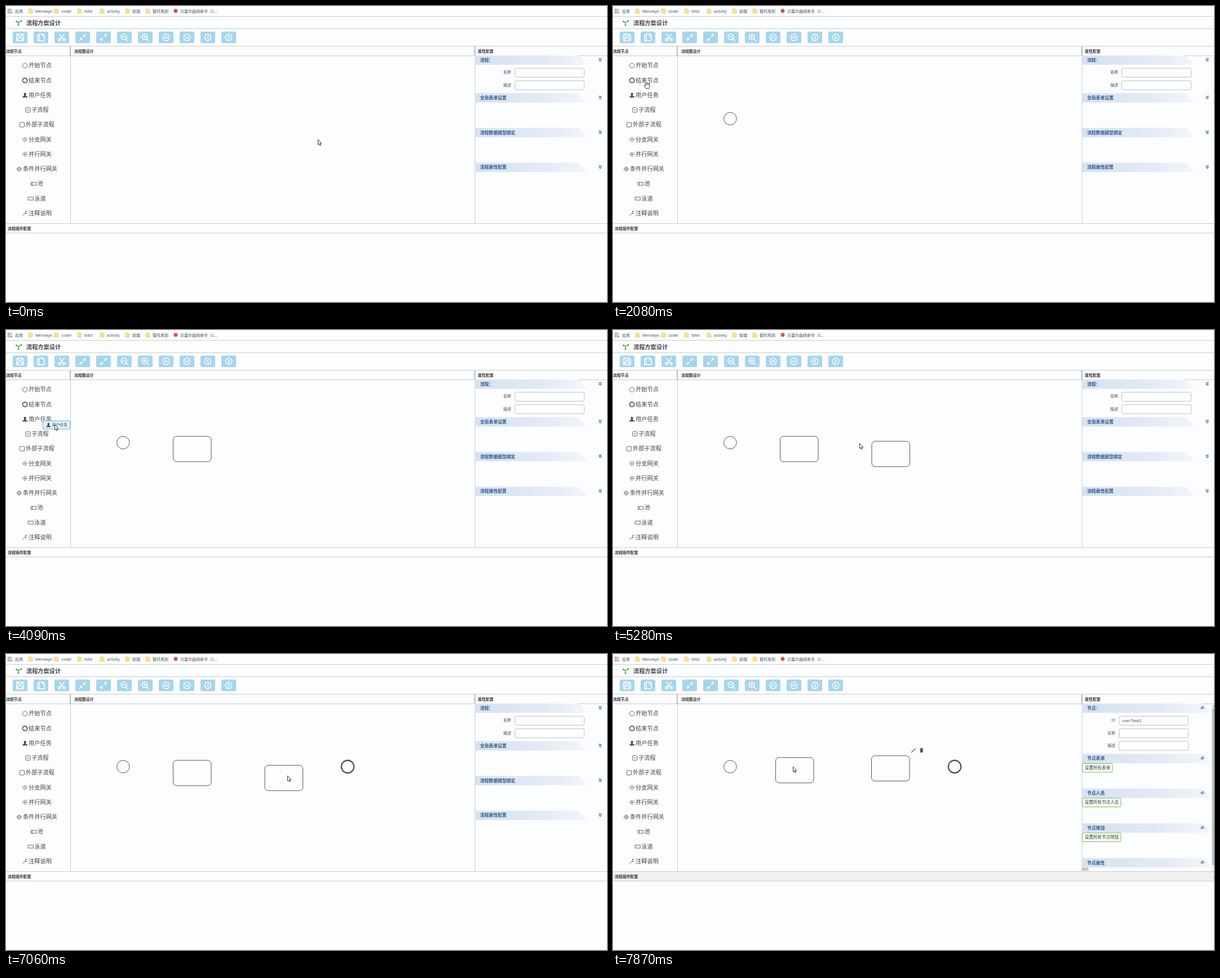
Recreate the animation shown at these times as an HTML page. Size 1066 by 526 pixels, loop 7.99 s.

```html
<!DOCTYPE html>
<html lang="zh-CN">
<head>
<meta charset="utf-8">
<title>流程方案设计</title>
<style>
html, body { margin: 0; width: 100%; height: 100%; overflow: hidden; background: #fcfdff; }
svg { display: block; width: 1066px; height: 526px; }
text { font-family: "Open Sans", "Noto Sans CJK SC", "Noto Sans CJK JP", sans-serif; white-space: pre; }
.line { fill: none; stroke: #555; stroke-width: 1; }
.white { fill: none; stroke: #fff; stroke-width: 1.5; stroke-linecap: round; stroke-linejoin: round; }
</style>
</head>
<body>
<svg id="stage" viewBox="0 0 1066 526">
  <defs>
    <linearGradient id="bar">
      <stop offset="0" stop-color="#d6e2f1"/>
      <stop offset=".6" stop-color="#e2eaf5"/>
      <stop offset="1" stop-color="#f3f6fb"/>
    </linearGradient>
  </defs>
</svg>
<script>
const NS = 'http://www.w3.org/2000/svg';
const stage = document.getElementById('stage');

function el(tag, attrs, parent = stage) {
  const e = document.createElementNS(NS, tag);
  for (const k in attrs) e.setAttribute(k, attrs[k]);
  return parent.appendChild(e);
}
const group = (parent, x = 0, y = 0) => el('g', { transform: `translate(${x} ${y})` }, parent);
const path = (d, attrs, parent) => el('path', { d, ...attrs }, parent);
const rect = (x, y, width, height, attrs, parent) => el('rect', { x, y, width, height, ...attrs }, parent);
const circle = (cx, cy, r, attrs, parent) => el('circle', { cx, cy, r, ...attrs }, parent);

// y is the middle of the line of text
function text(s, x, y, size, attrs, parent) {
  const e = el('text', { x, y: y + size * 0.37, 'font-size': size, fill: '#444', ...attrs }, parent);
  e.textContent = s;
  return e;
}
const show = (e, on) => { e.style.display = on ? '' : 'none'; };
const place = (e, x, y) => e.setAttribute('transform', `translate(${x} ${y})`);

// Bookmark bar
const dots = ['#e0483e', '#e0483e', '#f2b632', '#45a45c', '#4a86e8', '#f2b632', '#45a45c', '#4a86e8', '#e0483e'];
dots.forEach((fill, i) => rect(3 + i % 3 * 3, 5 + Math.floor(i / 3) * 3, 2, 2, { fill }));
text('应用', 16, 9, 7);
const marks = [['Merowyn', 40], ['coder', 86], ['tkfol', 127], ['activity', 167], ['前端', 212], ['暂时用到', 248]];
for (const [name, x] of marks) {
  path(`M${x} 5h5v1.5h2v6.5h-7z`, { fill: '#fbe08a', stroke: '#e8c558', 'stroke-width': .6 });
  text(name, x + 12, 9, 7);
}
circle(301, 8.7, 3.4, { fill: '#e5483c' });
text('贝塞尔曲线命令（C...', 309, 9, 7);

// Title
path('M22.5 29.5L18.5 27.5M22.5 29.5L27 26.5M22.5 29.5L22 34', { stroke: '#4f9f55', 'stroke-width': 1.4 });
[[18.5, 27.5], [27, 26.5], [22, 34]].forEach(([x, y]) => circle(x, y, 1.4, { fill: '#4f9f55' }));
text('流程方案设计', 36, 30, 10.2, { 'font-weight': 700 });

// Toolbar
const ring = 'M-5.7 0a5.7 5.7 0 1 0 11.4 0a5.7 5.7 0 1 0 -11.4 0';
const lens = 'M-6 -1a5 5 0 1 0 10 0a5 5 0 1 0 -10 0M2.6 2.6L6 6M-3.3 -1h4.6';
const tools = [
  'M-6 -6H4L6 -4V6H-6ZM-3 -6V-2H3V-6M-4 6V1.5H4V6',
  'M-3 -6H3L6 -3V6H-3ZM-3 -4H-6V6H-3M3 -6V-3H6',
  'M-4.5 -6L3 3M4.5 -6L-3 3M-6 4a2 2 0 1 0 4 0a2 2 0 1 0 -4 0M2 4a2 2 0 1 0 4 0a2 2 0 1 0 -4 0',
  'M5.5 -5.5L1.5 -1.5M1.5 -4V-1.5H4M-5.5 5.5L-1.5 1.5M-4 1.5H-1.5V4',
  'M1.5 -1.5L5 -5M2.5 -5H5V-2.5M-1.5 1.5L-5 5M-5 2.5V5H-2.5',
  lens,
  lens + 'M-1 -3.3v4.6',
  ring + 'M-2.6 1.2L0 -1.4L2.6 1.2',
  ring + 'M-2.6 -1.2L0 1.4L2.6 -1.2',
  ring + 'M1.2 -2.6L-1.4 0L1.2 2.6',
  ring + 'M-1.2 -2.6L1.4 0L-1.2 2.6'
];
tools.forEach((d, i) => {
  rect(12 + i * 37, 45.5, 26, 20.5, { rx: 2, fill: '#a5d6ec' });
  path(d, { class: 'white' }, group(stage, 25 + i * 37, 55.8));
});

// Frame lines and headings
const gray = { fill: '#c9cbcd' };
const footer = rect(0, 387, 1066, 16, { fill: '#f0f0f0' });
[18, 40, 71, 88, 386, 403].forEach(y => rect(0, y, 1066, 1, gray));
[114, 831.5].forEach(x => {
  rect(x, 71, 1, 315, gray);
  rect(x - 1, 71, 2, 17, { fill: '#bbb' });
});
const bold = { 'font-weight': 600, fill: '#333' };
text('流程节点', 0, 80, 6.9, bold);
text('流程图设计', 121, 80, 6.9, bold);
text('属性配置', 837, 80, 6.9, bold);
text('流程插件配置', 3, 395, 6.9, bold);

// Node palette
const person = 'M-4.5 4V2.6L-1.2 1.2V.4Q-2.4 -1 -2 -2.8Q-1.5 -4.3 0 -4.3T2 -2.8Q2.4 -1 1.2 .4V1.2L4.5 2.6V4Z';
const diamond = 'M0 -4.3L4.3 0L0 4.3L-4.3 0Z';
const box = 'M-3 -4H3Q4 -4 4 -3V3Q4 4 3 4H-3Q-4 4 -4 3V-3Q-4 -4 -3 -4Z';
const disc = 'M-4.2 0a4.2 4.2 0 1 0 8.4 0a4.2 4.2 0 1 0 -8.4 0';
const nodes = [
  ['开始节点', disc],
  ['结束节点', disc, { 'stroke-width': 1.7 }],
  ['用户任务', person, { fill: '#444', stroke: 'none' }],
  ['子流程', box + 'M-2 0H2'],
  ['外部子流程', box],
  ['分支网关', diamond + 'M-1.5 -1.5L1.5 1.5M1.5 -1.5L-1.5 1.5'],
  ['并行网关', diamond + 'M-2 0H2M0 -2V2'],
  ['条件并行网关', diamond + 'M-2 0a2 2 0 1 0 4 0a2 2 0 1 0 -4 0'],
  ['池', 'M-4.5 -2.7H4.5V2.7H-4.5ZM-2.2 -2.7V2.7'],
  ['泳道', 'M-4.5 -2.7H4.5V2.7H-4.5Z'],
  ['注释说明', 'M-4.5 4L1 -1M4 -4H1V0H3.5']
];
const glyph = (i, parent) => {
  const { fill = 'none', stroke = '#555', ...rest } = nodes[i][2] || {};
  path(nodes[i][1], { fill, stroke, 'stroke-width': .9, ...rest }, parent);
};
nodes.forEach(([name], i) => {
  const y = 106 + i * 26.25;
  const x = 60.5 - name.length * 5.1;
  text(name, x, y - .3, 10.2);
  glyph(i, group(stage, x - 6.5, y));
});

// Property panels
const chevrons = [];
function section(parent, title, y, right) {
  path(`M832 ${y - 8}H${right - 17}Q${right - 10} ${y - 4} ${right} ${y + 8.5}H832Z`, { fill: 'url(#bar)' }, parent);
  text(title, 841, y, 7.8, { 'font-weight': 600, fill: '#2a5588' }, parent);
}
function chevron(parent, x, y) {
  return path('M-2.5 -2.8L0 -.5L2.5 -2.8M-2.5 .3L0 2.6L2.5 .3',
    { fill: 'none', stroke: '#2a5588', 'stroke-width': 1.1 }, group(parent, x, y - .5));
}
function field(parent, label, x, y) {
  text(label, x - 6, y - .7, 7, { 'text-anchor': 'end' }, parent);
  rect(x + .5, y - 8, 123, 16, { rx: 2, fill: '#fcfdff', stroke: '#bfc1c3' }, parent);
}

const flowPanel = group();
[['流程：', 96], ['全局表单设置', 163], ['流程数据模型绑定', 224.7], ['流程属性配置', 286.5]].forEach(([s, y]) => {
  section(flowPanel, s, y, 1031);
  chevron(flowPanel, 1054, y);
});
field(flowPanel, '名称', 902, 118.5);
field(flowPanel, '描述', 902, 140.8);

const nodePanel = group();
const forms = [['节点：', 96], ['节点表单', 185.5, '设置所有表单'], ['节点人员', 247.2, '设置所有节点人员'],
  ['节点按钮', 309, '设置所有节点按钮'], ['节点属性', 370.7]];
forms.forEach(([s, y, button]) => {
  section(nodePanel, s, y, 1061);
  chevrons.push(chevron(nodePanel, 1045.5, y));
  if (!button) return;
  rect(832.5, y + 9, button.length * 7.55 + 8, 15.5, { rx: 2, fill: '#fafff6', stroke: '#6cc24a' }, nodePanel);
  text(button, 836.7, y + 16.5, 7.55, { fill: '#333' }, nodePanel);
});
field(nodePanel, 'ID', 897, 118.5);
field(nodePanel, '名称', 897, 140.8);
field(nodePanel, '描述', 897, 163.1);
text('userTask2', 903, 118.5, 7.4, {}, nodePanel);
text('005', 832, 382.3, 6.7, {}, nodePanel);
rect(1062, 89, 4, 297, { fill: '#f1f1f1' }, nodePanel);
rect(1062.5, 97, 3.5, 278, { fill: '#bfbfbf' }, nodePanel);
path('M1063 94l2 -2l1 1v1zM1064 398l2 -2v2z', { fill: '#777' }, nodePanel);

// Diagram
const startEvent = circle(207.8, 200.2, 11.2, { class: 'line' });
const endEvent = circle(606, 200.2, 11.2, { class: 'line', style: 'stroke-width:2.3' });
const task = () => rect(.5, .5, 67.5, 45, { rx: 6, class: 'line' }, group());
const task1 = task().parentNode;
const task2 = task().parentNode;
const handles = group();
path('M529 174.5C532 175 532 169 537 168.5', { fill: 'none', stroke: '#333', 'stroke-width': 1.1 }, handles);
path('M544.3 168h2v-1h2v1h2v1.4h-6zM544.8 170h5l-.5 5h-4z', { fill: '#333' }, handles);
path('M546.5 170.8v3.3M548.2 170.8v3.3', { stroke: '#aaa', 'stroke-width': .5 }, handles);

// Dragged labels and pointer
const ghosts = [0, 1, 2].map(i => {
  const g = group();
  rect(.5, .5, 48, 14.5, { rx: 1, fill: '#dff1fb', 'fill-opacity': .85, stroke: '#5cbbe3' }, g);
  const icon = group(g, 10, 8);
  icon.setAttribute('transform', 'translate(10.3 8) scale(.9)');
  glyph(i, icon);
  text(nodes[i][0], 16.5, 7.2, 6.9, {}, g);
  return g;
});
const outline = { fill: '#fff', stroke: '#222', 'stroke-width': .9, 'stroke-linejoin': 'round' };
const arrow = group();
path('M.5 .5V9.6L2.5 7.8L4 11L5.4 10.4L4 7.3H6.8Z', outline, arrow);
const hand = group();
path('M-2 5.3L-5 1Q-5 -.8 -3.2 .4L-3.8 -3Q-3 -4.6 -2 -3.2L-1.4 -4.6Q-.2 -5.6 .5 -4.4Q2 -5.3 2.6 -3.6Q4.3 -4.2 4.5 -2.4L4.2 2L3 5.3Z', outline, hand);
path('M-1.8 -3L-1.3 -.5M.5 -4.2V-.6M2.6 -3.4L2.4 -.4', { fill: 'none', stroke: '#222', 'stroke-width': .7 }, hand);

// Refresh steps: [time, equal steps until the next row]
const ticks = [[0, 1], [150, 7], [1170, 1], [1290, 1], [1570, 4], [2080, 3], [2500, 1], [2650, 4], [3160, 3],
  [3580, 1], [3700, 3], [4090, 4], [4600, 1], [4880, 1], [5280, 7], [6250, 1], [6370, 5], [7060, 2],
  [7330, 1], [7480, 3], [7870, 1]];
// Pointer route, kept in legs of [time, x, y]
const legs = [
  [[0, 553, 237], [150, 510, 218], [587, 60, 106], [733, 72, 113], [1024, 207, 200], [1570, 200, 192]],
  [[1952, 66, 136], [2080, 60.5, 141.5], [2220, 62, 157], [2500, 229, 186], [2777, 296, 189], [3301, 296, 189]],
  [[3580, 50, 154], [3700, 45, 150], [3960, 64, 160], [4090, 86, 168], [4473, 458, 197], [4880, 458, 197]],
  [[5280, 437, 201], [5557, 60, 135], [5696, 92, 141], [5973, 605, 199], [6112, 605, 199], [6250, 664, 214]],
  [[6370, 655, 215], [7060, 499, 216], [7195, 499, 216], [7480, 499, 199], [7740, 327, 205], [7870, 319, 200]]
];
const route = legs.flat();
const drags = [[0, 730, 1285], [2, 2350, 3295], [2, 4085, 4875], [1, 5690, 6245]];
const LOOP = 7990;

function snap(t) {
  let i = ticks.length - 1;
  while (i > 0 && ticks[i][0] > t) i--;
  const [a, n] = ticks[i];
  const step = ((ticks[i + 1] || [LOOP])[0] - a) / n;
  return a + Math.floor((t - a) / step + 1e-6) * step;
}
function at(t) {
  const i = route.findIndex(p => p[0] > t);
  if (i < 0) return route[route.length - 1].slice(1);
  if (i === 0) return route[0].slice(1);
  const [a, x, y] = route[i - 1], [b, u, v] = route[i];
  // the pointer rests until the first refresh and while a drop settles
  const k = t < 150 || (t >= 1290 && t < 1570) || (t >= 4880 && t < 5280) ? 0 : (t - a) / (b - a);
  return [x + (u - x) * k, y + (v - y) * k];
}
const ramp = (t, a, b) => Math.min(1, Math.max(0, (t - a) / (b - a)));

function draw(time) {
  const t = snap(time);
  const [x, y] = at(t);
  const drag = drags.find(d => t >= d[1] && t < d[2]);
  ghosts.forEach((g, i) => show(g, drag && drag[0] === i));
  if (drag) {
    const [gx, gy] = at(snap(Math.max(0, t - 5)));
    place(ghosts[drag[0]], gx + 1, gy + 1);
  }
  const grab = !drag && x > 20 && x < 92;
  show(hand, grab);
  show(arrow, !grab);
  place(grab ? hand : arrow, x, y);

  show(startEvent, t >= 1285);
  show(task1, t >= 3295);
  show(task2, t >= 4875);
  show(endEvent, t >= 6245);
  const m1 = ramp(t, 7740, 7870), m2 = ramp(t, 7195, 7480);
  place(task1, 296 - 8 * m1, 188.5 - 5 * m1);
  place(task2, 458.5 - .5 * m2, 197.3 - 17 * m2);
  show(handles, t >= 7475);

  const picked = t >= 7190;
  show(flowPanel, !picked);
  show(nodePanel, picked);
  show(footer, picked);
  const turn = 60 * ramp(t, 7330, 7870);
  chevrons.forEach(c => c.setAttribute('transform', `rotate(${turn})`));
}

const begin = performance.now();
function tick() {
  draw((performance.now() - begin) % LOOP);
  requestAnimationFrame(tick);
}
tick();
</script>
</body>
</html>
```
